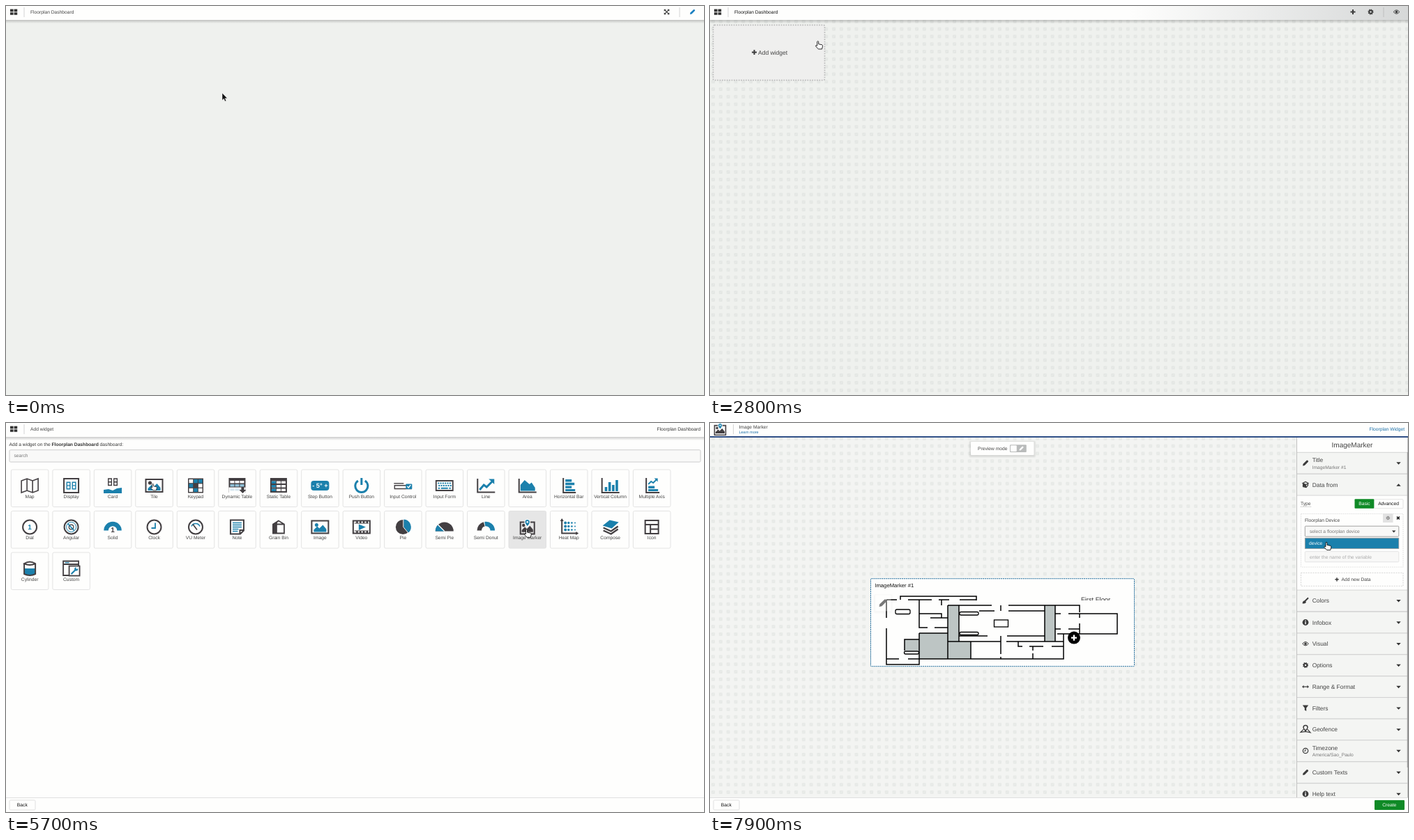
An HTML page for the animation above (8000 ms loop, 1001 px wide and 559 px high).

```html
<!DOCTYPE html>
<html lang="en">
<head>
<meta charset="utf-8">
<title>Adding an image marker widget</title>
<style>
  html, body { margin: 0; width: 100%; height: 100%; overflow: hidden; background: #eff1ee; }
  svg { display: block; width: 100%; height: 100%; }
  text { font-family: "Liberation Sans", Arial, sans-serif; text-rendering: geometricPrecision; white-space: pre; }
</style>
</head>
<body>
<svg id="stage" viewBox="0 0 1001 559" preserveAspectRatio="none"></svg>
<script>
const DARK = '#433f42', BLUE = '#1b80ac', GREEN = '#0f8a26', INK = '#3c3c3c', PAPER = '#fefefd';

// Drawing helpers, all returning SVG markup
const fill = (d, c = DARK) => `<path d="${d}" fill="${c}"/>`;
const line = (d, c = DARK, w = 2, more = '') => `<path d="${d}" fill="none" stroke="${c}" stroke-width="${w}" ${more}/>`;
const disc = (x, y, r, c = DARK) => `<circle cx="${x}" cy="${y}" r="${r}" fill="${c}"/>`;
const ring = (r, c = DARK, w = 2, more = '') => `<circle r="${r}" fill="none" stroke="${c}" stroke-width="${w}" ${more}/>`;
const box = (x, y, w, h, c, stroke = 'none', r = 0, more = '') =>
  `<rect x="${x}" y="${y}" width="${w}" height="${h}" rx="${r}" fill="${c}" stroke="${stroke}" ${more}/>`;
const text = (x, y, s, size = 6.7, c = '#444', more = '') =>
  `<text x="${x}" y="${y + size * .36}" font-size="${size}" fill="${c}" ${more}>${s}</text>`;
const at = (x, y, content, s = 1) => `<g transform="translate(${x} ${y}) scale(${s})">${content}</g>`;
const group = (id, content) => `<g id="${id}">${content}</g>`;
const raised = (x, y, w, h) => [3, 2, 1].map(d => box(x - d, y - d + 1, w + 2 * d, h + 2 * d, '#000', 'none', d, 'opacity=".035"')).join('') +
  box(x, y, w, h, PAPER, 'none', 1);
const MID = 'text-anchor="middle"', END = 'text-anchor="end"', BOLD = 'font-weight="bold"';

// Small interface icons
const pencil = (c = INK) => fill('M-4 4L-3.4 1.2 1.6-3.7Q2.4-4.4 3.2-3.7L3.8-3.1Q4.4-2.4 3.7-1.6L-1.2 3.4Z', c);
const plus = (c = INK) => fill('M-1-3.5H1V-1H3.5V1H1V3.5H-1V1H-3.5V-1H-1Z', c);
const gear = (c = INK) => ring(2.2, c, 1.9) + ring(3.4, c, 1.3, 'stroke-dasharray="1.335"');
const eye = line('M-4.3 0Q0-5.4 4.3 0Q0 5.4-4.3 0Z', INK, 1) + disc(0, 0, 1.8, INK);
const expand = line('M-2.6-2.6L2.6 2.6M2.6-2.6L-2.6 2.6', INK, 1.3) +
  fill('M-3.8-3.8h3l-3 3zM3.8-3.8v3l-3-3zM3.8 3.8h-3l3-3zM-3.8 3.8v-3l3 3z', INK);
const gridIcon = fill('M6 4.5h4.6v3.8H6zM11.6 4.5h4.6v3.8h-4.6zM6 9.2h4.6v3.6H6zM11.6 9.2h4.6v3.6h-4.6z', '#333');
const caretDown = fill('M-3.2-1.7H3.2L0 1.7Z', '#333');
const arrow = `<path d="M0 0V10.5L2.4 8.3 4 12 5.8 11.2 4.2 7.7H7.4Z" fill="#111" stroke="#fff" stroke-width=".5"/>`;
const hand = `<path d="M-1 .9Q0-.6 1 .9V4.4L5.8 5.4Q7 5.8 6.8 7.4L5.8 11.6H.6L-3.2 7.4Q-3.6 5.6-1 6.8Z" fill="#fff" stroke="#111" stroke-width=".9"/>`;

// Widget icons, centred on the origin
const axes = line('M-12-10V9.5H13');
const frame = line('M-12-9H12V9H-12Z');
const hills = c => fill('M-9 7V4L-4-1-1 2 4-3 9 3V7Z', c);
const eights = (y, c) => line(`M-6.3 ${y}h4.6v9.5h-4.6zm0 4.7h4.6M1.7 ${y}h4.6v9.5h-4.6zm0 4.7h4.6`, c, 1.4);
const half = (c, from = '-9.5 5', to = '9.5 5') => line(`M${from}A9.5 9.5 0 0 1 ${to}`, c, 6.5);
const digit = (y, c) => text(0, y, '1', 10, c, `${MID} ${BOLD}`);
const cells = (c, rows) => rows.map(y => fill([-10, -3, 4].map(x => `M${x} ${y}h6v3.6h-6z`).join(''), c)).join('');
const table = fill('M-12-11H12V10H-12Z');
const pin = `<path d="M0 0Q-4-4-4-7A4 4 0 0 1 4-7Q4-4 0 0Z" fill="${BLUE}" stroke="#fff" stroke-width="1.2"/>` + disc(0, -7, 1.4, '#fff');
const markerIcon = line('M-10-7H10V10H-10Z') + disc(-5.5, -2.5, 2.2) + at(0, 1, hills(DARK), .9) + at(0, -.5, pin, .95);

const widgets = [
  ['Map', line('M-12-7L-4-10 4-7 12-10V7L4 10-4 7-12 10ZM-4-10V7M4-7V10', DARK, 1.6)],
  ['Display', line('M-10.5-10H10.5V10H-10.5Z') + eights(-4.8, BLUE)],
  ['Card', eights(-10, DARK) + fill('M-13 11V6L-6 5 0 7 6 4 13 3V11Z', BLUE)],
  ['Tile', frame + disc(-6, -4, 2.6) + hills(BLUE) + at(-2, -3, hand, .85)],
  ['Keypad', fill('M-11-10.5H11V10.5H-11Z') + [0, 1, 2, 3, 4, 5, 6, 7, 8].map(i =>
    box(-9.5 + i % 3 * 6.7, -9 + Math.floor(i / 3) * 6.4, 5.7, 5.2, [1, 2, 3, 7].includes(i) ? BLUE : i === 4 ? DARK : '#fff')).join('')],
  ['Dynamic Table', table + cells('#fff', [-7]) + cells('#8fc0d7', [-2]) + fill('M-12 2.5H12V11H-12Z', '#fff') + cells('#d8e8f0', [4]) + fill('M6 2h4v4h3L8 11 3 6h3z')],
  ['Static Table', table + cells('#fff', [-6.5, -1, 4.5]) + fill('M-10-6.5h6v3.6h-6zM-10-1h6v3.6h-6zM-10 4.5h6v3.6h-6z', BLUE)],
  ['Step Button', box(-13, -7, 26, 14, BLUE, 'none', 4) + text(0, 0, '- 5° +', 9.2, '#fff', `${MID} ${BOLD}`)],
  ['Push Button', line('M-5-7A9 9 0 1 0 5-7', BLUE, 3) + line('M0-11V-1', BLUE, 3)],
  ['Input Control', line('M-13-3.2H1', DARK, 1.4) + line('M-12-.3H12V4.5H-12Z', DARK, 1.4) + box(4, -2.5, 9, 7.5, BLUE, 'none', 1) + line('M6 1l2 2 3-4', '#fff', 1.3)],
  ['Input Form', line('M-12-7H12V7H-12Z', DARK, 1.8) + line('M-9.5-3.5H10M-8.5 0H10', BLUE, 2, 'stroke-dasharray="2 1.3"') + line('M-9 3.7h2.4M-5 3.7H5M6.6 3.7H9', BLUE)],
  ['Line', axes + line('M-9 6L-3-1 1 2 9-6', BLUE, 3) + fill('M4-9.5H12V-2Z', BLUE)],
  ['Area', axes + fill('M-10 7.5V-1L-4-8 3-2 6-4.5 11 3V7.5Z', BLUE)],
  ['Horizontal Bar', line('M-8-11V10H10') + fill('M-5-9H4v3.5H-5zM-5-4.3H8v3.5H-5zM-5 .4H4v3.4H-5zM-5 5H9V8H-5z', BLUE)],
  ['Vertical Column', line('M-12-11V10H13') + fill('M-8 2h3.6v6H-8zM-2.8-5H.8V8h-3.6zM2.4-1H6v9H2.4zM7.5-8h3.6V8H7.5z', BLUE)],
  ['Multiple Axis', line('M-8-11V10H11') + line('M-5-2L-1-6 2-4 7-9', BLUE, 1.8) + fill('M3.5-10.5H8.5V-5.5ZM-5 .5H4V4H-5zM-5 5H9V8H-5z', BLUE)],
  ['Dial', ring(10) + digit(0, BLUE)],
  ['Angular', ring(10) + ring(7, BLUE, 1) + ring(3.3, DARK, 1.2) + line('M-5-5L4 5', BLUE, 1.8)],
  ['Solid', half(BLUE) + digit(4, DARK)],
  ['Clock', ring(10) + line('M1.5-6V1.5H-4', BLUE, 1.8)],
  ['VU Meter', ring(10) + line('M-6-1A6.5 6.5 0 0 1 6-1', BLUE, 1.5) + line('M-4-4L2 4', DARK, 1.6)],
  ['Note', line('M-9.5-10H9.5V5L4.5 10H-9.5ZM9 4.5H4V10') + line('M-6.5-6H6.5M-6.5-3H6.5M-6.5 0H6.5M-6.5 3H2M-6.5 6H1', BLUE, 1.4)],
  ['Grain Bin', line('M-8-4L0-9 8-4V9H-8ZM-3-6V9M-3-4H8', DARK, 1.8) + fill('M-8-4L0-10-3-4V9H-8Z')],
  ['Image', frame + disc(-5, -3, 2.5, BLUE) + hills(BLUE)],
  ['Video', frame + line('M-10-7H10M-10 7H10', DARK, 4) + line('M-10-7H10M-10 7H10', '#fff', 2, 'stroke-dasharray="2.4"') + fill('M-4-4L6 0-4 4.5Z', BLUE)],
  ['Pie', disc(0, 0, 10.5) + fill('M1-11A11 11 0 0 1 8 8L1 0Z', BLUE) + line('M.5-11V0L8 9', '#fff', 1)],
  ['Semi Pie', fill('M-13 6A13 13 0 0 1 13 6Z') + fill('M-13 6A13 13 0 0 1-9-3.5L0 6Z', BLUE) + line('M-10-4L0 6', '#fff', 1.2)],
  ['Semi Donut', half(DARK, '-9.5 5', '-2.5-4.2') + half(BLUE, '-1.5-4.4', '9.5 5')],
  ['Image Marker', markerIcon],
  ['Heat Map', line('M-10-11V9H12') + fill('M-12.5-8.5L-10-12.5-7.5-8.5ZM10 6.5L14 9 10 11.5Z') +
    [0, 1, 2, 3].map(i => [-6, -1, 4].map(y => disc(-5 + i * 4.6, y, 2 - i * .35, BLUE)).join('')).join('')],
  ['Compose', line('M-10 5L1 10 11 3M-10 1L1 6 11-1', DARK, 2.2) + fill('M-11-2L-1-10 12-7 2 2Z', BLUE)],
  ['Icon', line('M-9.5-9.5H9.5V9.5H-9.5ZM-9.5-3.5H9.5M-2-3.5V9.5M-2 3H9.5')],
  ['Cylinder', fill('M-8 0H8V8Q0 12-8 8Z', BLUE) + line('M-8-7V8Q0 12 8 8V-7Q0-12-8-7Q0-3 8-7')],
  ['Custom', line('M-11.5-10.5H10.5V10H-11.5ZM-11.5-6H10.5', DARK, 1.8) + line('M-9-8.3H-3', BLUE, 1.2) + box(-3, -3.5, 15, 14, '#fff', DARK, 0, 'stroke-width="1.8"') + line('M0 8L7 1', BLUE, 2.2) + disc(7.2, .8, 2.6, BLUE) + fill('M7 1L7-3 11 0Z', '#fff')],
];
const HOVERED = 28;

const card = ([label, icon], i) => {
  const x = 7.4 + i % 16 * 59.47, y = 67 + Math.floor(i / 16) * 59.5;
  return `<g class="card">${box(x, y, 53.5, 53.5, PAPER, '#e0e0e0', 2, 'stroke-width=".9"')}` +
    at(x + 26.7, y + 23, icon) + text(x + 26.7, y + 38.5, label, 6.7, '#444', MID) + '</g>';
};

const header = box(0, 0, 1001, 20, PAPER) + box(0, 20, 1001, 5, 'url(#shade)');
const divider = x => line(`M${x} 2V16`, '#d0d0d0', .9);
const backButton = box(5, 542, 37, 14, PAPER, '#ddd', 1.5, 'stroke-width=".9"') + text(23.3, 549, 'Back', 6.7, '#111', MID);
const footerLine = line('M0 538.5H1001', '#ddd', .9);

const dashboard = box(0, 0, 1001, 559, '#eff1ee') + header + gridIcon + divider(26) + text(35, 9, 'Floorplan Dashboard') +
  at(947.5, 8.5, expand) + divider(966) + at(984.5, 8.5, pencil('#1a7fc0'), .9);

const editor = box(0, 0, 1001, 559, '#eff1ee') + box(0, 20, 1001, 539, 'url(#dots)') + header + box(0, 0, 1001, 20, 'url(#fade)') +
  gridIcon + divider(26) + text(35, 9, 'Floorplan Dashboard', 6.7, '#111') +
  at(922, 8.5, plus()) + at(947.5, 8.5, gear()) + line('M966 2V16', '#bbb', .9) + at(984.5, 8.5, eye) +
  box(4.5, 27.3, 160, 79.4, '#efefee', '#bbb', 2, 'stroke-width="1.7" stroke-dasharray="1.7"') +
  at(63.5, 66.5, plus()) + text(69, 67, 'Add widget', 8.5);

const picker = gridIcon + divider(26) + text(35, 9, 'Add widget') + text(996, 9, 'Floorplan Dashboard', 6.7, '#333', END) +
  text(4.5, 31, 'Add a widget on the <tspan font-weight="bold">Floorplan Dashboard</tspan> dashboard:', 6.7, '#333') +
  `<rect id="search" x="5" y="38.7" width="991" height="17.3" rx="1.5" fill="#f9f9f8"/>` + text(11.5, 47, 'search', 6.7, '#777') +
  group('caret', line('M11.8 43.5V51', '#111', .8)) + widgets.map(card).join('') + footerLine + backButton;

// Settings panel rows: label, centre y, icon, optional second line
const infoIcon = disc(0, 0, 4.4, INK) + line('M0-1V2.8M0-3V-1.8', '#fff', 1.4);
const panelRows = [
  ['Title', 57.5, pencil(), 'ImageMarker #1'],
  ['Data from', 88.5, line('M-4-2L0-4 4-2 1 0ZM-3.5-1.5V3L1 4 3.5 1V-2', INK, 1.2) + fill('M-3-1L1 0V4L-3 3Z', INK)],
  ['Colors', 255.3, line('M-1 1L4-4', INK, 2) + fill('M-1 0Q-4 0-4.5 4Q0 5 1 2Z', INK)],
  ['Infobox', 286.5, infoIcon],
  ['Visual', 317.2, eye],
  ['Options', 348, gear()],
  ['Range &amp; Format', 379, line('M-3.5 0H3.5', INK, 1.2) + fill('M-5 0l2.5-2.3v4.6zM5 0L2.5-2.3v4.6z', INK)],
  ['Filters', 409.6, fill('M-4.2-4H4.2L1.2 0V4.5L-1.2 2.8V0Z', INK)],
  ['Geofence', 440.4, line('M-3 0L-7 4 0 3 7 4.5 3 0M0 3V0', INK, 1.2) + line('M0 2Q-3-1-3-3A3 3 0 0 1 3-3Q3-1 0 2Z', INK, 1.5)],
  ['Timezone', 471, ring(3.7, INK, 1.2) + line('M0-2.4V.3H-2', INK, 1), 'America/Sao_Paulo'],
  ['Custom Texts', 502, pencil()],
  ['Help text', 533, infoIcon],
];
const panelRow = ([label, y, icon, note]) =>
  box(842, y - 15.2, 158, 30.8, '#f4f5f3') + line(`M842 ${y - 15.2}H1000M842 ${y + 15.5}H1000`, '#ccc', .8) + at(854, y, icon) +
  text(863.7, note ? y - 4.5 : y, label, 8.4) + (note ? text(863.7, y + 5.8, note, 6.7, '#777') : '') +
  at(987.5, y + .5, caretDown, label === 'Data from' ? -1 : 1);
const field = (y, hint, c, id) =>
  `<rect id="${id}" x="853.3" y="${y}" width="134.5" height="15" rx="1" fill="#f8f8f7" stroke="#e2e2e2" stroke-width=".9"/>` + text(860, y + 7.5, hint, 6.7, c);

const panel = box(841.5, 20, 159, 519, PAPER, '#bbb', 0, 'stroke-width=".9"') + text(921, 31, 'ImageMarker', 10, '#444', MID) +
  panelRows.map(panelRow).join('') + line('M1000.4 42V495', '#999', 1.2) +
  text(847, 116, 'Type') + line('M847 120.3H862', '#777', .6, 'stroke-dasharray="1"') +
  box(952, 109.7, 42, 13, PAPER, '#ddd', 1, 'stroke-width=".8"') + box(924.5, 109.3, 27.8, 13.5, GREEN, 'none', 1) +
  text(938.4, 116, 'Basic', 6.7, '#fff', MID) + text(973, 116, 'Advanced', 6.7, '#111', MID) +
  box(847.5, 130.5, 146.5, 76.5, PAPER, '#ddd', 0, 'stroke-width=".8" stroke-dasharray="2 1"') +
  box(965, 130, 14.5, 13, '#e2e2e2') + at(972.3, 136.5, gear('#888'), .7) + line('M985 134.6l3.8 3.8M988.8 134.6L985 138.4', '#222', 1.5) +
  text(853, 140, 'Floorplan Device') + field(148.2, 'select a floorplan device', '#777', 'select') + at(980.7, 156, caretDown, .85) +
  text(853, 176, 'Variable', 6.7, '#999') + field(184.7, 'enter the name of the variable', '#aaa', 'variable') +
  box(847.5, 215.3, 146.5, 19, PAPER, '#ccc', 0, 'stroke-width=".8" stroke-dasharray="2 1.4"') +
  at(899, 224.8, plus(), .75) + text(905.5, 224.8, 'Add new Data');

const WALL = '#000';
const plan = fill('M341 262H357V314H341ZM480 262H495V314H480ZM300 302H341V314H374V339H300ZM279 311H300V327H279Z', '#bdc5c4') +
  line('M273 254V249H382V255M253 254H268M284 254H318M328 254H343M358 254H382M253 254V280M253 295V347H300V339' +
    'M253 339H271M284 339H507V303M300 254V294H312M322 294H341V302M300 274H332V280M332 254V262M316 280H341M341 262V339' +
    'M300 302H341M300 302V339M279 327V311H300M341 262H404M428 262H530V272M357 262V314M386 270H408M428 270H480' +
    'M417 262V270M357 306H398M426 306H480M480 262V314M495 262V314M341 314H417M425 314H507M374 314V339M417 306V332M417 336V339' +
    'M442 314V321H448M458 321H478M490 321H507M463 321V327M463 331V339M495 274H503M514 274H584V303H498M530 274V280M530 288V303M495 296H503M514 296H530', WALL, 1.5) +
  [[266, 268, 21, 6.5, 2], [407.5, 283, 20, 10, 0], [358, 271.5, 27, 4.5, 2], [358, 300.5, 27, 4, 2], [278.5, 328, 21, 4, 2]]
    .map(([x, y, w, h, r]) => box(x, y, w, h, PAPER, WALL, r, 'stroke-width="1.3"')).join('') +
  `<g clip-path="url(#titleClip)">${text(532, 253.9, 'First Floor', 9.4, '#333')}</g>` +
  disc(522, 308.6, 9, '#000') + at(522, 308.6, plus('#fff'), 1.15);

const config = box(0, 0, 1001, 559, '#f3f4f2') + box(0, 20, 1001, 519, 'url(#dots)', 'none', 0, 'opacity=".8"') +
  raised(374, 27, 90.5, 19) + text(384, 36.6, 'Preview mode') +
  box(430, 31.3, 23.8, 10.6, '#b9bbbb', 'none', 1) + box(431, 32.3, 8.8, 8.6, PAPER, 'none', 1) + at(446.5, 36.6, pencil('#fff'), .75) +
  box(230.5, 223.7, 378, 126, PAPER, '#236f9f', 1, 'stroke-width="1" stroke-dasharray="2 .9"') + text(236.3, 233, 'ImageMarker #1', 7.7, '#111') +
  group('plan', plan) + group('layerButton', raised(237, 247.3, 22.5, 23)) + at(248, 258.7, pencil('#777'), 1.35) +
  group('emptyNote', text(373.2, 295.8, 'Click on', 8.4) + at(410, 296, pencil(), .75) + text(417, 295.8, 'to add layers', 8.4)) + panel +
  group('dropdown', box(853.3, 165.3, 134.5, 15.2, BLUE, '#999', 0, 'stroke-width=".8"') + text(859, 173, 'device', 6.7, '#fff')) +
  box(0, 0, 1001, 19, PAPER) + box(0, 19, 1001, 1.8, '#1c3f7c') + at(14.5, 9.2, markerIcon, .8) + divider(33.5) +
  text(41.5, 6, 'Image Marker') + text(41.5, 12.7, 'Learn more', 5.5, '#1a6fa8') + text(996, 9, 'Floorplan Widget', 6.7, '#1a6fa8', END) +
  box(0, 538.5, 1001, 21, PAPER) + footerLine + backButton + box(953, 542, 43, 14, GREEN, 'none', 1) + text(974.3, 549, 'Create', 6.7, '#fff', MID);

document.getElementById('stage').innerHTML = `<defs>
  <pattern id="dots" width="10.815" height="10.815" patternUnits="userSpaceOnUse" patternTransform="translate(-.9 -4.8)">
    <rect x="2.9" y="2.9" width="5" height="5" rx="1.3" fill="#e3e6e3"/><path d="M4 6.6L6.6 4" stroke="#eceeec" stroke-width=".9"/></pattern>
  <linearGradient id="shade" x2="0" y2="1"><stop stop-opacity=".2"/><stop offset="1" stop-opacity="0"/></linearGradient>
  <linearGradient id="fade"><stop offset=".6" stop-color="#d6d8d8" stop-opacity="0"/><stop offset="1" stop-color="#d6d8d8"/></linearGradient>
  <clipPath id="titleClip"><rect x="530" y="248" width="60" height="7"/></clipPath></defs>` +
  group('dashboard', dashboard) + group('editor', editor) + group('blank', box(0, 0, 1001, 559, PAPER) + header) +
  group('picker', picker) + group('config', config) + `<g id="cursor">${group('arrow', arrow)}${group('hand', hand)}</g>`;

const el = id => document.getElementById(id);
const cards = [...document.querySelectorAll('.card')];
const ramp = (t, from, to) => Math.min(1, Math.max(0, (t - from) / (to - from)));
const show = (node, opacity) => {
  node.style.display = opacity > 0 ? '' : 'none';
  node.style.opacity = opacity;
};

// Pointer path: time, x, y
const path = [
  [0, 310, 125], [200, 370, 146], [400, 550, 162], [700, 850, 95], [900, 934, 44], [1000, 934, 44], [1100, 960, 20],
  [1300, 989, 5], [1900, 989, 5], [2400, 868, 56], [2600, 307, 38], [2700, 307, 38], [2800, 154.7, 50.3], [3000, 154.7, 50.3],
  [3600, 328, 343], [5000, 328, 343], [5300, 755, 222], [5400, 755, 222], [5700, 746.5, 152.7], [5800, 746.5, 152.7],
  [5900, 746.5, 163], [6300, 746.5, 163], [6900, 876, 143.5], [7200, 876, 143.5], [7900, 884, 171], [8000, 884, 171],
];
const handTimes = [[1300, 1900], [2800, 3000], [5500, 5900], [6900, 8000]];

function pointer(t) {
  const i = path.findIndex(k => k[0] > t);
  const [t0, x0, y0] = path[i - 1], [t1, x1, y1] = path[i];
  const u = (t - t0) / (t1 - t0);
  return [x0 + (x1 - x0) * u, y0 + (y1 - y0) * u];
}

function draw(t) {
  show(el('dashboard'), t < 1900 ? 1 : 0);
  show(el('editor'), t < 3300 ? ramp(t, 1500, 1800) : 0);
  show(el('blank'), t < 5900 ? ramp(t, 2900, 3200) : 0);
  show(el('picker'), t < 5900 ? ramp(t, 3700, 3900) : 0);
  show(el('config'), t >= 5900 ? 1 : 0);

  cards.forEach((node, i) => show(node, ramp(t, 3835 + i * 16.5, 4050 + i * 16.5)));
  cards[HOVERED].firstChild.setAttribute('fill', t >= 5500 ? '#e6e6e6' : PAPER);
  el('search').setAttribute('stroke', t < 5700 ? '#2a80a8' : '#ccc');
  show(el('caret'), t < 5100 ? 1 : 0);

  show(el('layerButton'), 1 - .7 * ramp(t, 5900, 6200));
  show(el('emptyNote'), t < 6400 ? 1 : 0);
  show(el('plan'), ramp(t, 6300, 6600));
  show(el('dropdown'), t >= 7100 ? 1 : 0);
  el('select').setAttribute('stroke', t >= 7100 ? '#999' : '#e2e2e2');

  const isHand = handTimes.some(([from, to]) => t >= from && t < to);
  show(el('arrow'), isHand ? 0 : 1);
  show(el('hand'), isHand ? 1 : 0);
  el('cursor').setAttribute('transform', `translate(${pointer(t)})`);
}

// The picture advances ten times a second
function tick() {
  draw(Math.floor(performance.now() % 8000 / 100) * 100);
  requestAnimationFrame(tick);
}
tick();
</script>
</body>
</html>
```
